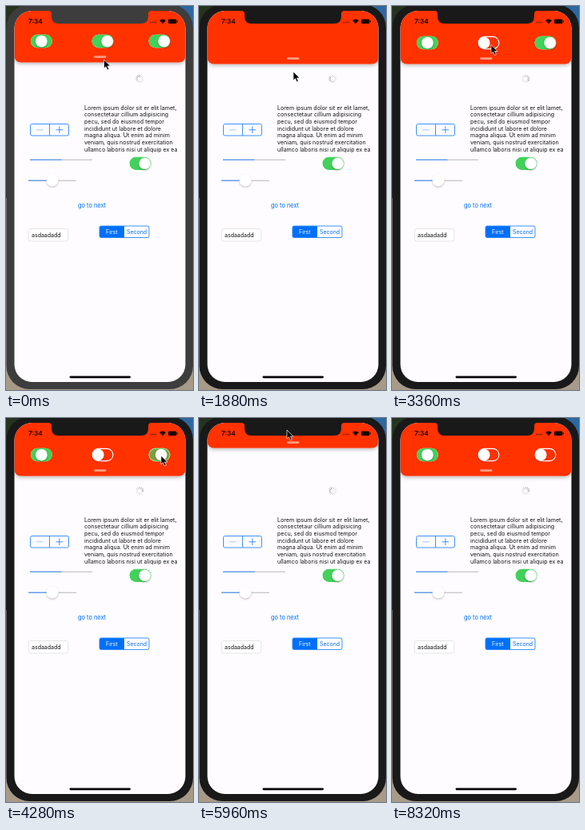
These frames come from a looping animation (234x480 px, 8360 ms). An HTML page:

```html
<!DOCTYPE html>
<html lang="en">
<head>
<meta charset="utf-8">
<title>Pull-down panel</title>
<style>
  html, body { margin: 0; width: 100%; height: 100%; overflow: hidden; background: #222; }
  svg { display: block; width: 100%; height: 100%; }
  text { font: 7px Inter, "Liberation Sans", sans-serif; }
  .blue { fill: #0070fa; }
  .line { fill: none; stroke: #2a86fa; stroke-width: .9; }
  .rail { stroke: #b5b5b9; stroke-width: 1.1; }
</style>
</head>
<body>
<svg viewBox="0 0 234 480">
  <defs>
    <clipPath id="screen"><rect x="10.5" y="6" width="214" height="464" rx="22"/></clipPath>
    <filter id="panelShadow" x="-10%" y="-10%" width="120%" height="130%">
      <feDropShadow dx="0" dy="1.5" stdDeviation="2.5" flood-opacity=".3"/>
    </filter>
    <filter id="knobShadow" x="-50%" y="-50%" width="200%" height="200%">
      <feDropShadow dx="0" dy="1.2" stdDeviation="1.1" flood-opacity=".28"/>
    </filter>
  </defs>

  <!-- desktop corners behind the phone -->
  <rect width="117" height="240" fill="#26331f"/>
  <rect x="117" width="117" height="240" fill="#2d68a0"/>
  <rect y="240" width="234" height="240" fill="#a89a88"/>
  <rect class="bezel" x=".5" y="-2" width="233.5" height="481" rx="29"/>

  <g clip-path="url(#screen)">
    <rect x="10" y="6" width="215" height="464" fill="#fefcff"/>
    <g id="spinner" stroke="#666" stroke-width=".8" stroke-linecap="round"/>
    <g id="lorem" fill="#111"/>

    <rect class="line" x="30.5" y="147.5" width="48" height="14.5" rx="2"/>
    <path class="line" d="M54.5 147.5v14.5M62.5 154.8h8.5M66.8 150.5v8.5"/>
    <path class="line" d="M38 154.8h8.5" opacity=".5"/>

    <path class="rail" d="M30 192.2h78M28 218.2h60"/>
    <path class="line" d="M30 192.2h39.5M28 218.2h30"/>
    <circle cx="58" cy="217.8" r="7.4" fill="#fff" filter="url(#knobShadow)"/>

    <g id="bodySwitch"/>
    <text class="blue" x="90" y="252" style="font-size:7.4px">go to next</text>

    <rect x="28.3" y="278.5" width="49.5" height="15.5" rx="2.5" fill="#fff" stroke="#dedee0" stroke-width=".8"/>
    <text x="32" y="289" fill="#111">asdaadadd</text>

    <path class="blue" d="M148 275h-29q-2 0-2 2v10.500q0 2 2 2h29z"/>
    <rect class="line" x="117" y="275" width="62" height="14.5" rx="2"/>
    <text x="132.3" y="284.8" fill="#fff" text-anchor="middle">First</text>
    <text class="blue" x="163.5" y="284.8" text-anchor="middle">Second</text>

    <rect x="79.5" y="462.4" width="76.5" height="2.8" rx="1.4" fill="#050505"/>

    <g id="panel">
      <rect x="10.5" y="-60" width="214" height="132.5" rx="8" fill="#ff3300" filter="url(#panelShadow)"/>
      <rect x="110" y="64.2" width="15.5" height="2.8" rx="1.4" fill="#ff9a80"/>
      <g id="switches"/>
    </g>

    <g fill="#1b0500">
      <text x="28" y="22" style="font-size:8.2px;font-weight:600">7:34</text>
      <path d="M180.5 20.5h8" stroke="#6e1800" stroke-width="1.4" stroke-dasharray="1.4 1"/>
      <path d="M192 18a5.8 5.8 0 0 1 8 0l-4 4.200z"/>
      <rect x="203" y="16.6" width="10.5" height="5.400" rx="1.5"/>
      <rect x="214" y="18.3" width=".8" height="2"/>
    </g>
  </g>

  <path class="bezel" d="M53 5h129v1q-4 0-4 4v3q0 9-9 9h-103q-9 0-9-9v-3q0-4-4-4z"/>
  <path id="cursor" d="M0 0v11l2.500-2.300 1.900 4.200 1.900-.9-1.800-4h3.500z" stroke="#fff" stroke-width=".7"/>
</svg>

<script>
const LOOP = 8360, TRAVEL = 35, MOVE = 550;
const $ = id => document.getElementById(id);

function add(parent, tag, attrs, content = "") {
  const el = document.createElementNS("http://www.w3.org/2000/svg", tag);
  for (const k in attrs) el.setAttribute(k, attrs[k]);
  el.textContent = content;
  return parent.appendChild(el);
}

const clamp = (v, lo, hi) => Math.min(hi, Math.max(lo, v));

// Smooth rise from 0 to 1.
function ramp(t, start, length) {
  const u = clamp((t - start) / length, 0, 1);
  return u * u * (3 - 2 * u);
}

`Lorem ipsum dolor sit er elit lamet,
consectetaur cillium adipisicing
pecu, sed do eiusmod tempor
incididunt ut labore et dolore
magna aliqua. Ut enim ad minim
veniam, quis nostrud exercitation
ullamco laboris nisi ut aliquip ex ea`.split("\n").forEach((s, i) =>
  add($("lorem"), "text", { x: 98, y: 129.8 + i * 8.67, style: "font-size:7.1px" }, s));

const ticks = Array.from({ length: 12 }, (_, i) =>
  add($("spinner"), "path", { d: "M0-3v-1.700", transform: `translate(167.3 91) rotate(${i * 30})` }));

// Returns a setter: 1 is on, 0 is off.
function makeSwitch(parent, x, y) {
  const g = add(parent, "g", { transform: `translate(${x} ${y})` });
  const box = { x: -12.9, y: -7.6, width: 25.8, height: 15.2, rx: 7.6, "stroke-width": 1.1 };
  add(g, "rect", { ...box, fill: "none", stroke: "#fff" });
  const track = add(g, "rect", { ...box, fill: "#42d15a", stroke: "#42d15a" });
  const knob = add(g, "circle", { r: 7.3, fill: "#fff", filter: "url(#knobShadow)" });
  return on => {
    track.setAttribute("opacity", on);
    knob.setAttribute("cx", 5.7 * (2 * on - 1));
  };
}
makeSwitch($("bodySwitch"), 168, 196.8)(1);
const [, middle, right] = [44.3, 121, 192].map(x => makeSwitch($("switches"), x, 46));

// Pointer path: departure time and destination of each move.
const home = { x: 122.5, y: 67 };
const moves = [
  { t: 160, x: 119.5, y: 34.5 },
  { t: 1200, x: 118, y: 82 },
  { t: 2450, x: 124, y: 48.5 },
  { t: 3500, x: 194, y: 47 },
  { t: 4520, x: 107, y: 50 },
  { t: 5120, x: 110, y: 15 },
  { t: 6250, x: 133, y: 134.5 },
  { t: 7300, x: 245, y: 190 }
];

function pointerAt(t) {
  return moves.reduce((p, m) => {
    const e = ramp(t, m.t, MOVE);
    return { x: p.x + (m.x - p.x) * e, y: p.y + (m.y - p.y) * e };
  }, home);
}

// Each drag carries the panel with the pointer and hides the switches.
const drags = [
  { start: 0, end: 2100, grip: 69, hide: 300 },
  { start: 5100, end: 7150, grip: 50, hide: 5350 }
];

function draw(t) {
  const { x, y } = pointerAt(t);
  const drag = drags.find(d => t >= d.start && t < d.end);
  const pull = drag ? clamp(y - drag.grip, -TRAVEL, 0) : 0;
  const hidden = drags.reduce((sum, d) => sum + ramp(t, d.hide, 200) - ramp(t, d.end, 250), 0);

  $("cursor").setAttribute("transform", `translate(${x} ${y})`);
  $("panel").setAttribute("transform", `translate(0 ${pull})`);
  $("switches").setAttribute("opacity", 1 - hidden);
  middle(1 - ramp(t, 3080, 220));
  right(1 - ramp(t, 4200, 220));

  const head = Math.floor(t * 12 / 1000);
  ticks.forEach((el, i) => el.setAttribute("opacity", Math.max(.25, .85 - (head - i + 12) % 12 * .1)));

  // The window frame is paler until the first click focuses it.
  const shade = t < 200 ? "#3d3d3d" : "#191919";
  document.querySelectorAll(".bezel").forEach(el => el.setAttribute("fill", shade));
}

const start = performance.now();
function tick() {
  draw((performance.now() - start) % LOOP);
  requestAnimationFrame(tick);
}
tick();
</script>
</body>
</html>
```
